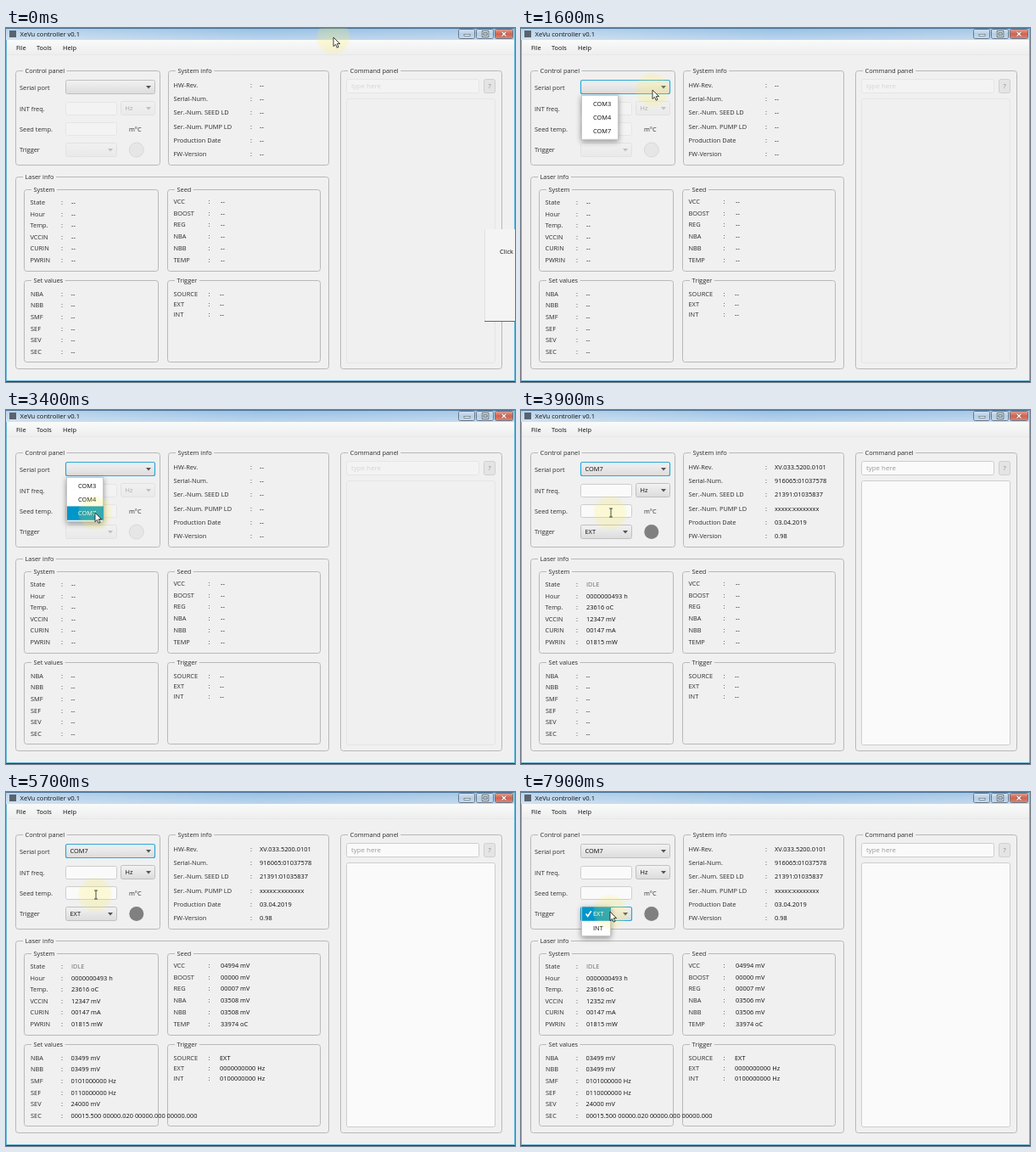
Animation, 600 px wide and 417 px high, one loop 8 s. Source, as an HTML page:

```html
<!DOCTYPE html>
<html lang="en">
<head>
<meta charset="utf-8">
<title>Device panel</title>
<style>
  html, body { margin: 0; width: 100%; height: 100%; overflow: hidden; background: #f0f0f0; }
  svg { display: block; width: 600px; height: 417px; }
  text { font: 7.4px "Open Sans", "Noto Sans", sans-serif; fill: #2c2c2c; white-space: pre; }
  .value { fill: #0c0c0c; }
  .idle { fill: #707070; }
  .off { opacity: .3; }
  .frame { fill: none; stroke: #b8b8b8; }
  .field { fill: #fafafa; stroke: #cdcdcd; }
  .button { fill: url(#face); stroke: #c0c0c0; }
  .help { fill: #e4e4e4; stroke: #cfcfcf; }
  .focus { stroke: #2ba9d6; stroke-width: 1.2; }
  .menu { fill: #fff; stroke: #c6c6c6; filter: drop-shadow(0 2px 3px rgba(0, 0, 0, .4)); }
  .picked { fill: #fff; }
</style>
</head>
<body>
<svg id="stage" viewBox="0 0 600 417">
  <defs>
    <linearGradient id="face" x2="0" y2="1">
      <stop stop-color="#f2f2f2"/><stop offset="1" stop-color="#dcdcdc"/>
    </linearGradient>
    <linearGradient id="bar">
      <stop stop-color="#b9d3ea"/><stop offset=".5" stop-color="#96bfe4"/><stop offset="1" stop-color="#a8c8e6"/>
    </linearGradient>
    <linearGradient id="gloss" x2="0" y2="1">
      <stop stop-color="#fff" stop-opacity=".4"/><stop offset=".5" stop-color="#fff" stop-opacity=".05"/>
      <stop offset="1" stop-color="#fff" stop-opacity=".25"/>
    </linearGradient>
    <linearGradient id="sheen" x2="0" y2="1">
      <stop stop-color="#fff" stop-opacity="0"/><stop offset="1" stop-color="#fff" stop-opacity=".35"/>
    </linearGradient>
    <linearGradient id="strip" x2="0" y2="1">
      <stop stop-color="#f9fafa"/><stop offset="1" stop-color="#eeeeee"/>
    </linearGradient>
    <radialGradient id="glow">
      <stop stop-color="#fff04a" stop-opacity=".24"/><stop offset=".85" stop-color="#fff04a" stop-opacity=".18"/>
      <stop offset="1" stop-color="#fff04a" stop-opacity=".06"/>
    </radialGradient>
  </defs>
</svg>
<script>
const LOOP = 8000, STEP = 100;
const OPEN_PORT = 1200, PICK_PORT = 3500, CONNECT = 3600, LOAD = 3700, OPEN_TRIGGER = 7800;
const stage = document.getElementById('stage');

function add(parent, tag, attrs, content) {
  const el = document.createElementNS('http://www.w3.org/2000/svg', tag);
  for (const key in attrs) el.setAttribute(key, attrs[key]);
  if (content) el.textContent = content;
  return parent.appendChild(el);
}
const group = (parent = stage) => add(parent, 'g', {});
const label = (parent, x, y, content, cls = '') => add(parent, 'text', { x, y, class: cls }, content);
const box = (parent, x, y, width, height, cls, rx = 2) =>
  add(parent, 'rect', { x, y, width, height, rx, class: cls });
const fill = (parent, x, y, width, height, color) =>
  add(parent, 'rect', { x, y, width, height, fill: color });
const path = (parent, d, attrs) => add(parent, 'path', { d, fill: 'none', ...attrs });
const show = (el, on) => el.setAttribute('visibility', on ? 'inherit' : 'hidden');

function panel(x, y, right, bottom, title) {
  box(stage, x + .5, y + .5, right - x - 1, bottom - y - 1, 'frame', 3);
  const gap = fill(stage, x + 9, y - 3, 10, 7, '#f0f0f0');
  const text = label(stage, x + 11.5, y + 3, title);
  gap.setAttribute('width', text.getComputedTextLength() + 5);
}

function combo(parent, x, y, width, content) {
  const frame = box(parent, x + .5, y + .5, width - 1, 16, 'button');
  const text = label(parent, x + 5.5, y + 11.2, content, 'value');
  path(parent, `M${x + width - 11} ${y + 7}h6l-3 3.4z`, { fill: '#555' });
  return { frame, text };
}

// Each row keeps its readout; values may be a list of [time, text] updates.
const rows = [];
function table(x, colon, valueX, y, step, entries) {
  entries.forEach(([name, value], i) => {
    const base = y + i * step;
    label(stage, x, base, name);
    label(stage, colon, base, ':');
    rows.push({ el: label(stage, valueX, base, '--', 'value'), value });
  });
}

function drawWindow() {
  fill(stage, 0, 0, 600, 417, '#f0f0f0');
  fill(stage, 0, 0, 600, 14, 'url(#bar)');
  fill(stage, 0, 0, 600, 14, 'url(#sheen)');
  fill(stage, 0, 0, 600, 1, '#4f7598');
  fill(stage, 4, 3, 8, 8, '#59636d');
  label(stage, 16.5, 10, 'XeVu controller v0.1', 'value').style.fontSize = '7.6px';

  [[533, 20, '#b4cce4'], [554, 21, '#b4cce4'], [576, 22, '#cf5a45']].forEach(([x, w, color]) => {
    add(stage, 'rect', { x: x + .5, y: 1.5, width: w - 1, height: 11, rx: 2, fill: color, stroke: '#66798d' });
    fill(stage, x + 1, 2, w - 2, 10, 'url(#gloss)');
  });
  add(stage, 'rect', { x: 540, y: 7.5, width: 7, height: 2, fill: '#fff', stroke: '#455', 'stroke-width': .6 });
  add(stage, 'rect', { x: 562, y: 4.5, width: 6, height: 5, fill: 'none', stroke: '#344', 'stroke-width': 2.4 });
  add(stage, 'rect', { x: 562, y: 4.5, width: 6, height: 5, fill: 'none', stroke: '#fff' });
  path(stage, 'M584.5 4.5l5 5m0-5l-5 5', { stroke: '#6b3028', 'stroke-width': 2.4 });
  path(stage, 'M584.5 4.5l5 5m0-5l-5 5', { stroke: '#fff', 'stroke-width': 1.5 });

  fill(stage, 1, 14, 598, 17, 'url(#strip)');
  fill(stage, 1, 31, 598, 1, '#e8e8e8');
  [[12, 'File'], [36, 'Tools'], [67, 'Help']].forEach(([x, name]) => label(stage, x, 26, name, 'value'));
  fill(stage, 0, 14, 1, 402, '#63b4d4');
  fill(stage, 599, 0, 1, 416, '#63b4d4');
  fill(stage, 0, 415, 600, 1, '#63b4d4');
  fill(stage, 0, 416, 600, 1, '#2f3f4a');
}

drawWindow();
panel(11, 50, 182, 162, 'Control panel');
panel(191, 50, 381, 162, 'System info');
panel(394, 50, 585, 402, 'Command panel');
panel(11, 175, 381, 402, 'Laser info');
panel(21, 190, 180, 287, 'System');
panel(190, 190, 371, 287, 'Seed');
panel(21, 297, 180, 394, 'Set values');
panel(190, 297, 371, 394, 'Trigger');

[['Serial port', 73], ['INT freq.', 97.5], ['Seed temp.', 122], ['Trigger', 146]]
  .forEach(([name, y]) => label(stage, 16, y, name));
label(stage, 145, 122, 'm°C');

const seedReading = [[0, '03508 mV'], [6500, '03506 mV']];
table(197.5, 288, 299, 70, 16.2, [
  ['HW-Rev.', 'XV.033.5200.0101'], ['Serial-Num.', '916065:01037578'],
  ['Ser.-Num. SEED LD', '21391:01035837'], ['Ser.-Num. PUMP LD', 'xxxxx:xxxxxxxx'],
  ['Production Date', '03.04.2019'], ['FW-Version', '0.98']]);
table(28.5, 65, 77, 208, 13.6, [
  ['State', 'IDLE'], ['Hour', '0000000493 h'], ['Temp.', '23616 oC'],
  ['VCCIN', [[0, '12347 mV'], [6200, '12350 mV'], [7100, '12352 mV']]],
  ['CURIN', '00147 mA'], ['PWRIN', '01815 mW']]);
table(197.5, 238.5, 253, 207, 13.7, [
  ['VCC', '04994 mV'], ['BOOST', '00000 mV'], ['REG', '00007 mV'],
  ['NBA', seedReading], ['NBB', seedReading], ['TEMP', '33974 oC']]);
table(29, 65, 76.5, 315.5, 13.7, [
  ['NBA', '03499 mV'], ['NBB', '03499 mV'], ['SMF', '0101000000 Hz'],
  ['SEF', '0110000000 Hz'], ['SEV', '24000 mV'],
  ['SEC', '00015.500 00000.020 00000.000 00000.000']]);
table(197.5, 238.5, 252, 315.5, 12.2, [
  ['SOURCE', 'EXT'], ['EXT', '0000000000 Hz'], ['INT', '0100000000 Hz']]);

const port = combo(stage, 70, 61, 106, 'COM7');
box(stage, 563.5, 60.5, 13, 16, 'help');
label(stage, 568.5, 71.3, '?').style.fill = '#888';
const gated = group();
box(gated, 70.5, 87.5, 60, 15, 'field');
combo(gated, 135, 86, 41, 'Hz');
box(gated, 70.5, 111.5, 60, 15, 'field');
const trigger = combo(gated, 70, 135, 61, 'EXT');
const lamp = add(gated, 'circle', { cx: 153.8, cy: 143.5, r: 8.5 });
box(gated, 401.5, 60.5, 156, 16, 'field');
const hint = label(gated, 407, 71.3, 'type here');
hint.style.fill = '#999';
hint.style.fontSize = '7.9px';
const log = box(gated, 401.5, 83.5, 175, 311, 'field');

function menu(x, y, width, top, names) {
  const g = group();
  box(g, x + .5, y + .5, width - 1, top - y + names.length * 16.4 + 1, 'menu', 0);
  const items = names.map((name, i) => {
    const rowY = top + i * 16.4;
    const bar = fill(g, x + 1, rowY, width - 1, 16.4, '#0096c9');
    return { bar, text: label(g, x + 14, rowY + 11, name) };
  });
  return { g, items };
}
function highlight(list, index) {
  list.items.forEach(({ bar, text }, i) => {
    show(bar, i === index);
    text.setAttribute('class', i === index ? 'picked' : 'value');
  });
}
const ports = menu(71, 79, 44, 80.6, ['COM3', 'COM4', 'COM7']);
const modes = menu(71, 135, 35, 135.4, ['EXT', 'INT']);
path(modes.g, 'M76.5 143.5l2.2 2.8l4-6', { stroke: '#fff', 'stroke-width': 1.6 });
highlight(modes, 0);

const note = group();
fill(note, 0, 237, 150, 108, '#f4f4f4');
fill(note, 0, 237, .6, 108, '#d4d4d4');
fill(note, 0, 345, 150, 1, '#666');
label(note, 18, 265.5, 'Click', 'value');

const pointer = group();
add(pointer, 'circle', { r: 20.5, fill: 'url(#glow)' });
const arrow = path(pointer, 'M0 0V10.6L2.5 8.3L4.2 12.2L6 11.4L4.3 7.6H7.6Z',
  { fill: '#fff', stroke: '#111', 'stroke-width': .8 });
const beam = path(pointer, 'M-1 -5H3M1 -5V5M-1 5H3', { stroke: '#222', 'stroke-width': .8 });

const moves = [[0, 386, 11], [900, 155, 73], [1800, 155, 73], [2500, 108, 112],
  [2900, 105, 121], [7400, 105, 121], [7700, 105, 141], [LOOP, 105, 141]];
function pointerAt(t) {
  const i = moves.findIndex(m => m[0] > t);
  const [t0, x0, y0] = moves[i - 1], [t1, x1, y1] = moves[i];
  const k = (t - t0) / (t1 - t0), e = k * k * (3 - 2 * k);
  return [x0 + (x1 - x0) * e, y0 + (y1 - y0) * e];
}

function readout(row, i, t) {
  if (t < LOAD + Math.floor(i / 4) * STEP) return '--';
  if (!Array.isArray(row.value)) return row.value;
  return row.value.filter(([from]) => from <= t).pop()[1];
}

function render(t) {
  const [x, y] = pointerAt(t);
  const online = t >= CONNECT;
  pointer.setAttribute('transform', `translate(${x} ${y})`);
  const typing = online && t < 7600;
  show(arrow, !typing);
  show(beam, typing);

  note.setAttribute('transform', `translate(${564 + t * .2} 0)`);
  show(note, t < 200);

  show(ports.g, t >= OPEN_PORT && t < PICK_PORT);
  const inside = x > 71 && x < 115;
  highlight(ports, inside ? Math.floor((y - 80.6) / 16.4) : -1);
  show(modes.g, t >= OPEN_TRIGGER);

  const onTrigger = t >= OPEN_TRIGGER - STEP;
  port.frame.setAttribute('class', t >= OPEN_PORT && !onTrigger ? 'button focus' : 'button');
  trigger.frame.setAttribute('class', onTrigger ? 'button focus' : 'button');
  show(port.text, t >= PICK_PORT);
  show(trigger.text, online);
  gated.setAttribute('class', online ? '' : 'off');
  lamp.setAttribute('fill', online ? '#808080' : '#d0d0d0');
  lamp.setAttribute('stroke', online ? 'none' : '#a0a0a0');
  log.style.fill = online ? '#fafafa' : '#f0f0f0';

  rows.forEach((row, i) => {
    const text = readout(row, i, t);
    if (row.el.textContent !== text) row.el.textContent = text;
    row.el.setAttribute('class', text === 'IDLE' ? 'idle' : 'value');
  });
}

const start = performance.now();
function tick() {
  const t = (performance.now() - start) % LOOP;
  render(Math.floor(t / STEP) * STEP);
  requestAnimationFrame(tick);
}
tick();
</script>
</body>
</html>
```
